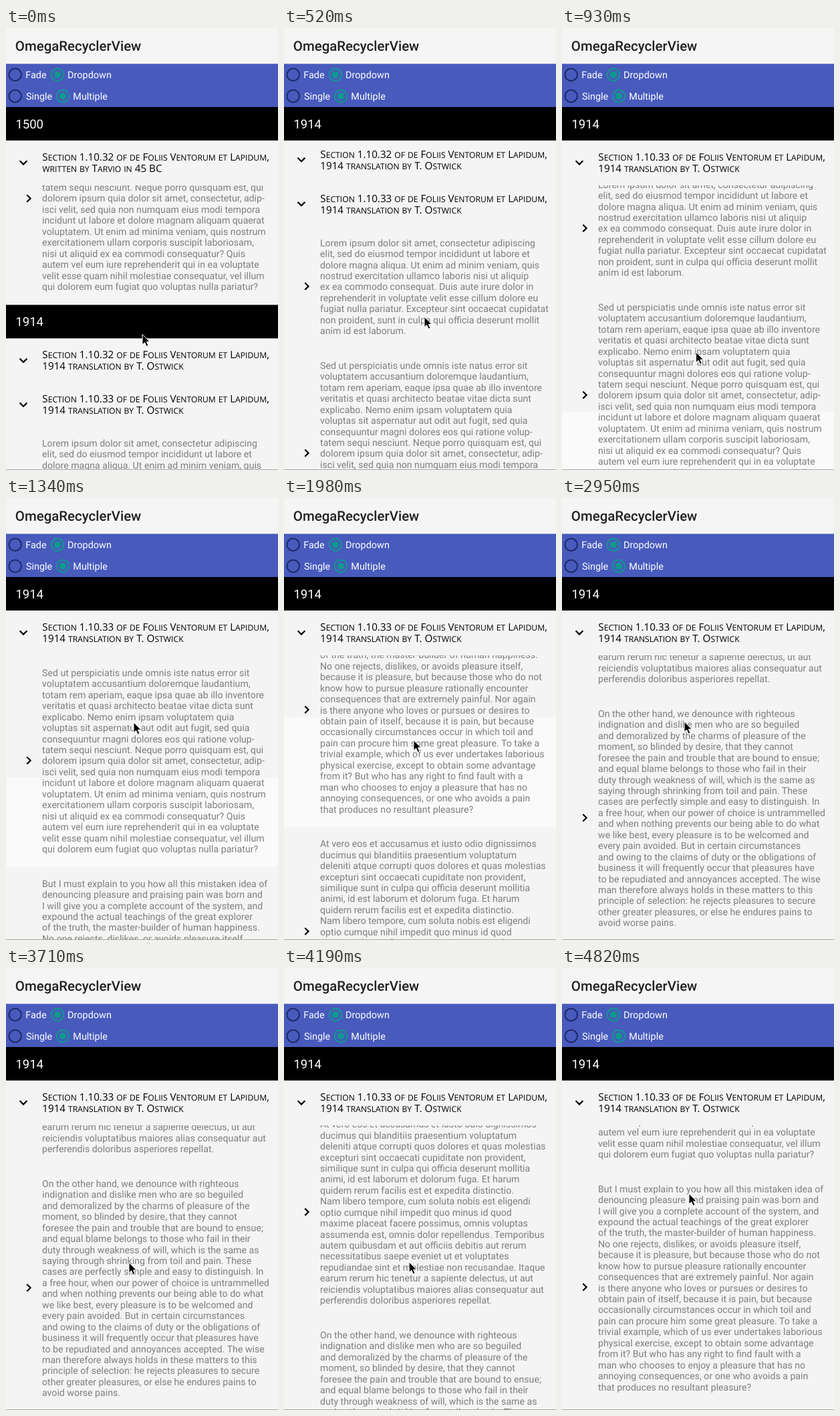
Recreate the animation shown at these times as an HTML page. Size 407 px wide and 660 px high, loop 4920 ms.

```html
<!DOCTYPE html>
<html lang="en">
<head>
<meta charset="utf-8">
<title>OmegaRecyclerView</title>
<style>
html, body { margin: 0; width: 100%; height: 100%; overflow: hidden; background: #f4f4f4; }
#stage { position: absolute; width: 407px; height: 660px; overflow: hidden; background: #f4f4f4;
  font-family: Roboto, sans-serif; text-rendering: geometricPrecision; }
#stage div, #stage svg { position: absolute; left: 0; top: 0; }
#list, .year, .section, .body, .band { width: 407px; }
.body { color: #7e7e7e; font-size: 14.15px; line-height: 16.43px; white-space: pre; }
.body div { padding: 17.7px 0 0 54px; }
.band { background: #fafafa; }
.section { height: 67px; background: #f4f4f4; color: #000; }
.section div { padding: 16.5px 0 0 54.3px; font: 15.2px/17px "Open Sans", sans-serif; white-space: pre; }
.section span { font-size: .8em; text-transform: uppercase; }
.year { height: 50px; background: #000; color: #fff; font-size: 18.5px; line-height: 52px; text-indent: 14.4px; }
.chevron { fill: none; stroke: #000; stroke-width: 2.2; }
#edge { top: 659px !important; width: 407px; height: 1px; background: #a6a6a6; }
</style>
</head>
<body>
<div id="stage">
  <div id="list"></div>
  <div id="sections"></div>
  <div id="years"></div>
  <svg id="toolbar" width="407" height="118" font-size="14.45" fill="#fff">
    <path fill="#f5f5f5" d="M0 0h407v54H0z"/>
    <path fill="#485abc" d="M0 53.5h407V118H0z"/>
    <text x="13.8" y="33.7" font-size="20.45" font-weight="500" fill="#212121">OmegaRecyclerView</text>
  </svg>
  <div id="edge"></div>
  <svg id="cursor" width="16" height="22" viewBox="-1 -1 16 22">
    <path d="M0 0V15.5L3.6 12.2 6.2 18 8.9 16.8 6.4 11.2H11.2Z" stroke="#fff" stroke-width="1"/>
  </svg>
</div>
<script>
const LOOP = 4920, LINE = 16.43, PAD = 35.4;
const YEAR_H = 50, SECTION_H = 66, YEAR_TOP = 118, SECTION_TOP = 168;
const $ = id => document.getElementById(id);

const lorem = `Lorem ipsum dolor sit amet, consectetur adipiscing
elit, sed do eiusmod tempor incididunt ut labore et
dolore magna aliqua. Ut enim ad minim veniam, quis
nostrud exercitation ullamco laboris nisi ut aliquip
ex ea commodo consequat. Duis aute irure dolor in
reprehenderit in voluptate velit esse cillum dolore eu
fugiat nulla pariatur. Excepteur sint occaecat cupidatat
non proident, sunt in culpa qui officia deserunt mollit
anim id est laborum.`;
const sedUt = `Sed ut perspiciatis unde omnis iste natus error sit
voluptatem accusantium doloremque laudantium,
totam rem aperiam, eaque ipsa quae ab illo inventore
veritatis et quasi architecto beatae vitae dicta sunt
explicabo. Nemo enim ipsam voluptatem quia
voluptas sit aspernatur aut odit aut fugit, sed quia
consequuntur magni dolores eos qui ratione volup-
tatem sequi nesciunt. Neque porro quisquam est, qui
dolorem ipsum quia dolor sit amet, consectetur, adip-
isci velit, sed quia non numquam eius modi tempora
incidunt ut labore et dolore magnam aliquam quaerat
voluptatem. Ut enim ad minima veniam, quis nostrum
exercitationem ullam corporis suscipit laboriosam,
nisi ut aliquid ex ea commodi consequatur? Quis
autem vel eum iure reprehenderit qui in ea voluptate
velit esse quam nihil molestiae consequatur, vel illum
qui dolorem eum fugiat quo voluptas nulla pariatur?`;
const butI = `But I must explain to you how all this mistaken idea of
denouncing pleasure and praising pain was born and
I will give you a complete account of the system, and
expound the actual teachings of the great explorer
of the truth, the master-builder of human happiness.
No one rejects, dislikes, or avoids pleasure itself,
because it is pleasure, but because those who do not
know how to pursue pleasure rationally encounter
consequences that are extremely painful. Nor again
is there anyone who loves or pursues or desires to
obtain pain of itself, because it is pain, but because
occasionally circumstances occur in which toil and
pain can procure him some great pleasure. To take a
trivial example, which of us ever undertakes laborious
physical exercise, except to obtain some advantage
from it? But who has any right to find fault with a
man who chooses to enjoy a pleasure that has no
annoying consequences, or one who avoids a pain
that produces no resultant pleasure?`;
const atVero = `At vero eos et accusamus et iusto odio dignissimos
ducimus qui blanditiis praesentium voluptatum
deleniti atque corrupti quos dolores et quas molestias
excepturi sint occaecati cupiditate non provident,
similique sunt in culpa qui officia deserunt mollitia
animi, id est laborum et dolorum fuga. Et harum
quidem rerum facilis est et expedita distinctio.
Nam libero tempore, cum soluta nobis est eligendi
optio cumque nihil impedit quo minus id quod
maxime placeat facere possimus, omnis voluptas
assumenda est, omnis dolor repellendus. Temporibus
autem quibusdam et aut officiis debitis aut rerum
necessitatibus saepe eveniet ut et voluptates
repudiandae sint et molestiae non recusandae. Itaque
earum rerum hic tenetur a sapiente delectus, ut aut
reiciendis voluptatibus maiores alias consequatur aut
perferendis doloribus asperiores repellat.`;
const otherHand = `On the other hand, we denounce with righteous
indignation and dislike men who are so beguiled
and demoralized by the charms of pleasure of the
moment, so blinded by desire, that they cannot
foresee the pain and trouble that are bound to ensue;
and equal blame belongs to those who fail in their
duty through weakness of will, which is the same as
saying through shrinking from toil and pain. These
cases are perfectly simple and easy to distinguish. In
a free hour, when our power of choice is untrammelled
and when nothing prevents our being able to do what
we like best, every pleasure is to be welcomed and
every pain avoided. But in certain circumstances
and owing to the claims of duty or the obligations of
business it will frequently occur that pleasures have
to be repudiated and annoyances accepted. The wise
man therefore always holds in these matters to this
principle of selection: he rejects pleasures to secure
other greater pleasures, or else he endures pains to
avoid worse pains.`;

function add(parent, className, html) {
  const el = document.createElement('div');
  el.className = className;
  el.innerHTML = html;
  $(parent).append(el);
  return el;
}
const moveTo = (el, y, x = 0) => { el.style.transform = `translate(${x}px,${y}px)`; };
const textHeight = text => text.split('\n').length * LINE + PAD;
const chevron = (path, y) =>
  `<svg class="chevron" width="48" height="20" style="top:${y - 10}px"><path d="${path}"/></svg>`;

function addBody(text, top) {
  const height = textHeight(text);
  const el = add('list', 'body', `<div>${text}</div>` + chevron('M31.3 4.8 36.6 10 31.3 15.2', height / 2 - 1.5));
  el.style.top = top + 'px';
  return top + height;
}
function addBand(bottom, height) {
  const el = add('list', 'band', '');
  el.style.cssText = `top:${bottom - height}px;height:${height}px`;
  return el;
}
function addSection(title) {
  const smallCaps = title.replace(/[a-z]+/g, '<span>$&</span>');
  return add('sections', 'section', `<div>${smallCaps}</div>` + chevron('M20.6 7.2 26 12.6 31.4 7.2', 33));
}
function addRadio(x, y, label, labelX, checked) {
  const color = checked ? '#0e9a8d' : '#1c2a66';
  $('toolbar').insertAdjacentHTML('beforeend',
    `<circle cx="${x}" cy="${y}" r="9.2" fill="none" stroke="${color}" stroke-width="2"/>` +
    (checked ? `<circle cx="${x}" cy="${y}" r="5" fill="${color}"/>` : '') +
    `<text x="${labelX}" y="${y + 5.3}">${label}</text>`);
}

addRadio(13.7, 69.7, 'Fade', 29.2);
addRadio(77, 69.7, 'Dropdown', 92.1, true);
addRadio(13.7, 101.7, 'Single', 29.9);
addRadio(85, 101.7, 'Multiple', 100.3, true);

// List coordinates equal stage coordinates at zero scroll.
const year1914Y = 414, section32Y = 464, section33Y = 530;
const bands = [addBand(1093.6, 133), addBand(1441.2, 163)];
addBody(sedUt, year1914Y - textHeight(sedUt));
[lorem, sedUt, butI, atVero, otherHand].reduce((top, text) => addBody(text, top), section33Y + SECTION_H);

const work = 'of de Foliis Ventorum et Lapidum,\n';
const section45 = addSection(`Section 1.10.32 ${work}written by Tarvio in 45 BC`);
const section32 = addSection(`Section 1.10.32 ${work}1914 translation by T. Ostwick`);
const section33 = addSection(`Section 1.10.33 ${work}1914 translation by T. Ostwick`);
const year1500 = add('years', 'year', '1500');
const year1914 = add('years', 'year', '1914');

// Monotone cubic curve through [time, value] points.
function curve(points) {
  const slopes = points.slice(1).map(([t, v], i) => (v - points[i][1]) / (t - points[i][0]));
  const tangents = points.map((_, i) => {
    const a = slopes[i - 1] ?? slopes[i], b = slopes[i] ?? a;
    return a * b > 0 ? 2 * a * b / (a + b) : 0;
  });
  return t => {
    let i = 0;
    while (i < points.length - 2 && t > points[i + 1][0]) i++;
    const [t0, v0] = points[i], [t1, v1] = points[i + 1];
    const h = t1 - t0, u = Math.min(1, (t - t0) / h), w = 1 - u;
    return v0 * w * w * (1 + 2 * u) + v1 * u * u * (3 - 2 * u)
      + h * u * w * (tangents[i] * w - tangents[i + 1] * u);
  };
}
const scrollAt = curve([[0, 0], [240, 135], [520, 300], [860, 375], [1100, 418], [1340, 542.5], [1680, 765],
  [1980, 949.2], [2240, 1150], [2500, 1302], [2840, 1459.5], [3860, 1459.5], [4010, 1365],
  [4150, 1262], [4400, 1085], [4600, 935], [4820, 789.5]]);
const cursorY = curve([[0, 458], [210, 340], [520, 431], [720, 484], [980, 484], [1340, 335], [1640, 480],
  [1780, 480], [1980, 362], [2080, 335], [2500, 434], [2620, 480], [2920, 332], [3380, 485],
  [3710, 440], [3870, 335], [4130, 475], [4310, 340], [4560, 475], [4820, 337]]);
const cursorX = curve([[0, 204], [520, 210], [1340, 191], [1980, 194], [2500, 191], [2950, 183],
  [3250, 173], [3710, 184], [4820, 190]]);

function draw(t) {
  const scroll = scrollAt(t);
  const y14 = year1914Y - scroll, y32 = section32Y - scroll, y33 = section33Y - scroll;
  moveTo($('list'), -scroll);
  moveTo(year1500, Math.min(YEAR_TOP, y14 - YEAR_H));
  moveTo(year1914, Math.max(YEAR_TOP, y14));
  moveTo(section45, Math.min(SECTION_TOP, y14 - SECTION_H));
  moveTo(section32, Math.min(Math.max(SECTION_TOP, y32), y33 - SECTION_H));
  moveTo(section33, Math.max(SECTION_TOP, y33));
  bands.forEach(band => { band.style.visibility = t < 2900 ? 'visible' : 'hidden'; });
  moveTo($('cursor'), cursorY(t) - 1, cursorX(t) - 1);
}
const start = performance.now();
function tick() {
  draw((performance.now() - start) % LOOP);
  requestAnimationFrame(tick);
}
tick();
</script>
</body>
</html>
```
